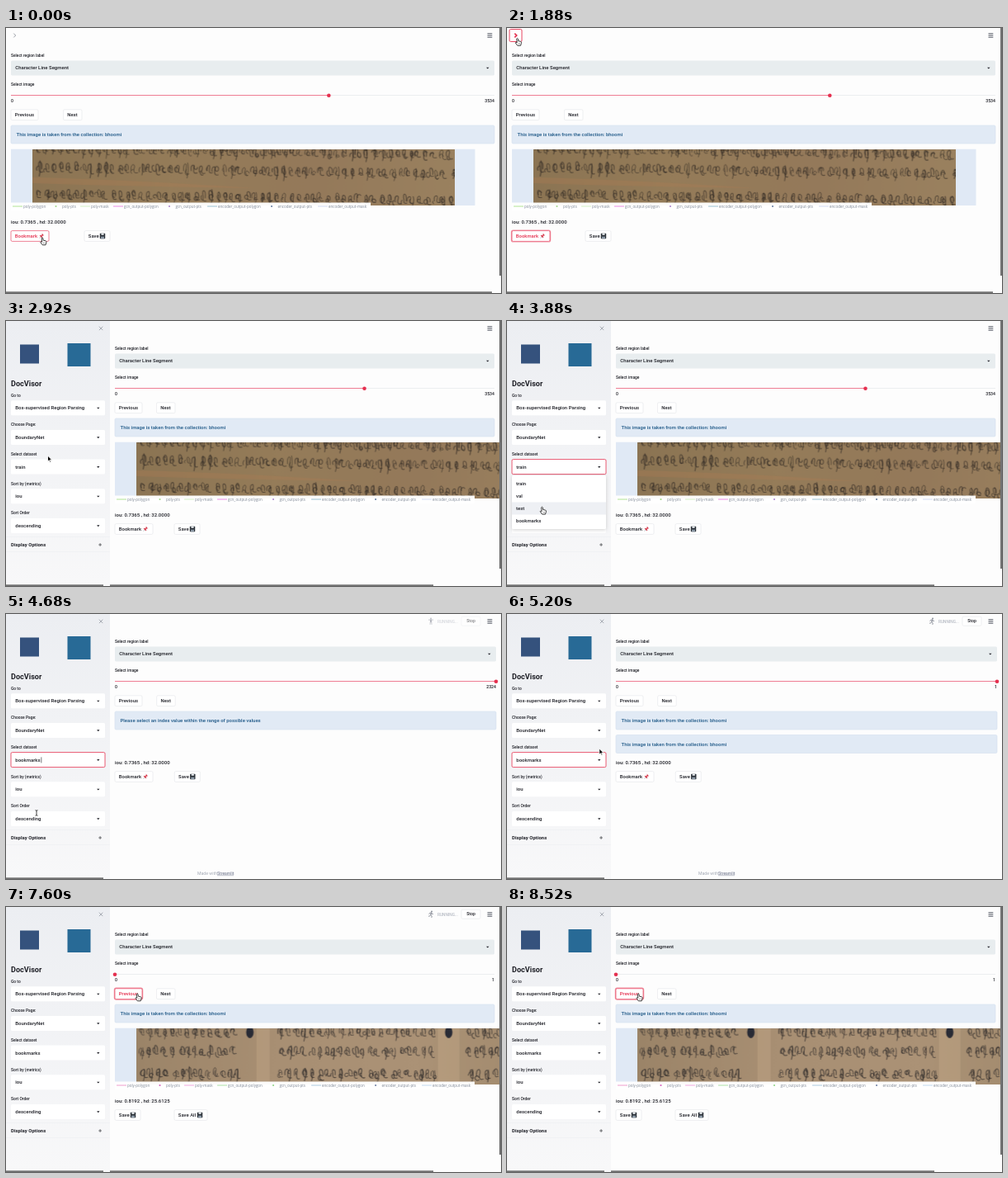
An HTML page with a canvas that plays this animation: 600x321 px, repeating every 8560 ms.

```html
<!DOCTYPE html>
<html lang="en">
<head>
<meta charset="utf-8">
<title>DocVisor</title>
<style>
html, body { margin: 0; width: 100%; height: 100%; overflow: hidden; background: #fdfdfd; }
canvas { display: block; width: 600px; height: 321px; }
</style>
</head>
<body>
<canvas id="c" width="600" height="321"></canvas>
<script>
const LOOP = 8560;
const ctx = document.getElementById('c').getContext('2d');
const SANS = 'Roboto, "Liberation Sans", sans-serif';
const LEGEND_FONT = '"Open Sans", sans-serif';
const RED = '#e5304f', INK = '#1e1f26', LINE = '#e2e4e8', BAR = '#727272';

const clamp = v => Math.max(0, Math.min(1, v));
const ease = v => { v = clamp(v); return v * v * (3 - 2 * v); };
const lerp = (a, b, k) => a + (b - a) * k;

function rng(seed) {
  return () => {
    seed = (seed + 0x6d2b79f5) | 0;
    let r = Math.imul(seed ^ (seed >>> 15), 1 | seed);
    r = (r + Math.imul(r ^ (r >>> 7), 61 | r)) ^ r;
    return ((r ^ (r >>> 14)) >>> 0) / 4294967296;
  };
}

// Large font scaled down keeps fractional advances at small sizes.
function text(str, x, y, { size = 6.02, color = INK, weight = 500, align = 'left', font = SANS } = {}) {
  ctx.save();
  ctx.translate(x, y + size * 0.355);
  ctx.scale(0.1, 0.1);
  ctx.font = `${weight} ${size * 10}px ${font}`;
  ctx.textAlign = align;
  ctx.fillStyle = color;
  ctx.fillText(str, 0, 0);
  ctx.restore();
}

function rect(x, y, w, h, fill) {
  ctx.fillStyle = fill;
  ctx.fillRect(x, y, w, h);
}

function box(x, y, w, h, r, fill, stroke, lw = 0.6) {
  ctx.beginPath();
  ctx.roundRect(x, y, w, h, r);
  if (fill) { ctx.fillStyle = fill; ctx.fill(); }
  if (stroke) { ctx.strokeStyle = stroke; ctx.lineWidth = lw; ctx.stroke(); }
}

function path(points, color, lw, close, fill) {
  ctx.beginPath();
  points.forEach(([x, y], i) => i ? ctx.lineTo(x, y) : ctx.moveTo(x, y));
  if (close) ctx.closePath();
  if (fill) { ctx.fillStyle = fill; ctx.fill(); }
  if (color) { ctx.strokeStyle = color; ctx.lineWidth = lw; ctx.stroke(); }
}

function dot(x, y, r, color) {
  ctx.beginPath();
  ctx.arc(x, y, r, 0, Math.PI * 2);
  ctx.fillStyle = color;
  ctx.fill();
}

// ---- manuscript pictures ----
// A curled stem, a small bowl beside it and sometimes a tail below.
function glyph(g, x, y, w, h, rand) {
  const top = y - h * (0.3 + rand() * 0.2), bot = y + h * (0.3 + rand() * 0.2);
  const stem = x + w * (0.3 + rand() * 0.4), side = rand() < 0.5 ? -1 : 1;
  g.beginPath();
  g.moveTo(stem - side * w * 0.35, y + h * 0.1);
  g.bezierCurveTo(stem - side * w * 0.5, top - 1, stem + side * w * 0.3, top - 2, stem, y);
  g.quadraticCurveTo(stem - w * 0.1, bot, stem + w * 0.45, bot - h * 0.1);
  g.stroke();
  g.beginPath();
  g.ellipse(x + w * (0.25 + rand() * 0.5), y + h * (rand() * 0.4 - 0.15), w * 0.24, h * (0.14 + rand() * 0.1),
    rand() - 0.5, rand() * 3, 4 + rand() * 3);
  g.stroke();
  if (rand() < 0.35) {
    g.beginPath();
    g.moveTo(x + w * 0.7, top);
    g.quadraticCurveTo(x + w * 0.9, y, x + w * 0.6, bot + h * 0.2);
    g.stroke();
  }
}

function picture({ seed, tones, ink, rows, slope, height, lw, gaps = [], extra }) {
  const c = document.createElement('canvas');
  c.width = 512; c.height = 68;
  const g = c.getContext('2d'), rand = rng(seed);
  const grad = g.createLinearGradient(0, 0, 512, 30);
  tones.forEach((t, i) => grad.addColorStop(i / (tones.length - 1), t));
  g.fillStyle = grad;
  g.fillRect(0, 0, 512, 68);
  extra(g);
  g.strokeStyle = ink;
  g.lineCap = 'round';
  for (const y of rows) {
    for (let x = 3; x < 508;) {
      const w = 7 + rand() * 3;
      g.lineWidth = lw * (0.8 + rand() * 0.4);
      if (!gaps.some(([a, b]) => x + w > a && x < b)) {
        glyph(g, x, y + slope * x + rand() * 2, w, height * (0.8 + rand() * 0.4), rand);
      }
      x += w + rand() * 1.2;
    }
  }
  return c;
}

const leafA = picture({
  seed: 11, tones: ['#8b7453', '#957c59', '#94795a', '#9a815f'], ink: 'rgba(48,42,36,.58)',
  rows: [-2, 21, 53], slope: 0.016, height: 14, lw: 1.15,
  extra(g) {
    g.fillStyle = 'rgba(168,122,84,.4)';
    g.beginPath();
    g.moveTo(0, 34);
    g.quadraticCurveTo(120, 37, 270, 47);
    g.quadraticCurveTo(120, 45, 0, 41);
    g.fill();
  }
});
const leafB = picture({
  seed: 29, tones: ['#9b8468', '#a88f73', '#ab9276', '#a0896c'], ink: 'rgba(44,40,40,.62)',
  rows: [4, 27, 54], slope: 0.001, height: 14, lw: 1.15, gaps: [[130, 162], [366, 392]],
  extra(g) {
    g.fillStyle = 'rgba(196,168,136,.4)';
    g.fillRect(146, 0, 16, 68);
    g.fillRect(366, 0, 26, 68);
    g.fillStyle = '#292b35';
    for (const x of [138, 379]) {
      g.beginPath();
      g.ellipse(x, 5, 4.5, 7, 0, 0, 7);
      g.fill();
    }
  }
});

// ---- small icons ----
function pin(x, y) {
  path([[x - 2.3, y + 2.6], [x, y]], '#8a8f98', 0.6);
  path([[x - 1.8, y - 0.7], [x + 0.9, y + 1.8]], '#c93545', 1.2);
  path([[x - 0.3, y + 0.3], [x + 1.8, y - 1.9]], '#e0475a', 1.7);
  path([[x + 0.7, y - 2.6], [x + 2.5, y - 0.8]], '#c93545', 1);
}

function floppy(x, y) {
  box(x - 3.2, y - 3.2, 6.4, 6.4, 0.6, '#2b3138');
  rect(x - 1.6, y - 3.2, 3.2, 2, '#e6eaee');
  rect(x - 2, y + 0.6, 4, 2.6, '#8b98a5');
}

function caret(x, y) {
  path([[x - 1.7, y - 0.9], [x + 1.7, y - 0.9], [x, y + 1]], null, 0, true, INK);
}

function button(label, x, y, w, { icon, hot, focus } = {}) {
  const h = 12.8;
  if (focus) box(x - 0.5, y - h / 2 - 0.5, w + 1, h + 1, 2, null, 'rgba(229,48,79,.5)', 1.4);
  box(x, y - h / 2, w, h, 1.5, '#fff', hot || focus ? RED : LINE);
  text(label, x + 4.8, y, { color: hot || focus ? RED : INK, size: 5.95 });
  if (icon) icon(x + w - 9, y);
}

// ---- timing ----
const MOVES = [
  [0, 44, 254], [760, 44, 254], [1600, 12.5, 12.5], [2240, 12.5, 12.5],
  [2880, 50.5, 163], [2960, 50.5, 163], [3120, 60, 175], [3280, 60, 175],
  [4160, 37, 241], [4800, 37, 241], [5160, 111.8, 163], [5480, 111.8, 163],
  [6360, 159.2, 105], [LOOP, 159.2, 105]
];
const RUNS = [[240, 760], [4440, 5640], [6760, 7640]];
const SELECTS = ['Go to', 'Choose Page:', 'Select dataset', 'Sort by (metrics)', 'Sort Order'];
const SETS = ['train', 'val', 'test', 'bookmarks'];
const rowY = i => 105.3 + i * 35.65;

function pointer(t) {
  const i = MOVES.findIndex(m => m[0] > t), a = MOVES[i - 1], b = MOVES[i];
  const k = ease((t - a[0]) / (b[0] - a[0]));
  return { x: lerp(a[1], b[1], k), y: lerp(a[2], b[2], k) };
}

function stateAt(t) {
  const p = pointer(t);
  const open = ease((t - 1960) / 300);
  const phase = t < 4560 ? 'first' : t < 4840 ? 'range' : t < 5240 ? 'both' : 'marked';
  const side = 126 * open, left = side + 6;
  const plot = phase === 'first' || phase === 'marked';
  const right = plot ? 592 : 594;
  return {
    t, p, open, phase, side, left, right, plot, width: right - left,
    menu: t >= 3200 && t < 4320,
    focusSet: t >= 3160 && t < 6600,
    chosen: t >= 4320 ? 'bookmarks' : 'train',
    zero: t >= 7120, second: t >= 7320
  };
}

// ---- page parts ----
const LEGENDS = {
  first: ['#a8e08a', '#a5d98c', '#cdeebc', '#e77fe0', '#b08ad0', '#8fb9cc', '#6c82a5', '#ccd5f0'],
  one: ['#ee92d8', '#cf70c8', '#f0a0dc', '#a3dda0', '#93d68a', '#f0c0a0', '#d8a04a', '#f0b8a8'],
  zero: ['#ee92c8', '#d765c0', '#f0a0dc', '#a3dd9c', '#93d68a', '#a4c5dc', '#7585a8', '#bcd4ee']
};
const ITEMS = [
  ['poly-polygon', 2], ['poly-pts', 49], ['poly-mask', 84], ['gcn_output-polygon', 124],
  ['gcn_output-pts', 186.5], ['encoder_output-polygon', 238], ['encoder_output-pts', 310.5],
  ['encoder_output-mask', 372]
];

function legend(x, colors) {
  rect(x, 211.5, 436, 9.5, 'rgba(255,255,255,.96)');
  ITEMS.forEach(([name, dx], i) => {
    const cx = x + dx;
    if (name.endsWith('pts')) dot(cx + 5.5, 216, 1.1, colors[i]);
    else path([[cx, 216], [cx + 12, 216]], colors[i], 0.9);
    text(name, cx + 13, 216, { size: 4.5, weight: 400, color: '#7c8593', font: LEGEND_FONT });
  });
}

function plot(s) {
  const x = s.left;
  ctx.save();
  ctx.beginPath();
  ctx.rect(s.side, 140, 598 - s.side, 90);
  ctx.clip();
  rect(x, 146.7, 562.5, 68.3, '#e0e9f5');
  ctx.drawImage(s.second ? leafB : leafA, x + 25.6, 146.7, 512, 68.3);
  legend(x, s.phase === 'first' ? LEGENDS.first : s.second ? LEGENDS.zero : LEGENDS.one);
  ctx.restore();
}

function info(s, y, str) {
  box(s.left, y, s.width, 22, 1.5, '#e1eaf5', '#d3dfee', 0.6);
  text(str, s.left + 6.5, y + 11, { color: '#1d5786', size: 6 });
}

function slider(s) {
  const { left, right, width, phase } = s;
  const frac = phase === 'first' ? 0.6575 : s.zero ? 0 : 1;
  const max = phase === 'first' ? '3534' : phase === 'range' ? '2324' : '1';
  const x = left + width * frac;
  rect(left, 81, width, 1, '#eceef0');
  rect(left, 81, x - left, 1, '#ee7d93');
  dot(x, 81.7, 2.3, RED);
  text('0', left, 88.6, { size: 5.2 });
  text(max, right, 88.6, { size: 5.2, align: 'right' });
}

function main(s) {
  const { left, width, right, phase, p, t } = s;
  text('Select region label', left, 33, { size: 4.9 });
  box(left, 39.5, width, 18, 1.5, '#e8edef');
  text('Character Line Segment', left + 5.3, 48.3);
  caret(right - 8.2, 48.6);
  text('Select image', left, 68.4, { size: 4.9 });
  slider(s);

  const overPrev = s.open === 1 && p.x > 132 && p.x < 165 && p.y > 99 && p.y < 112;
  button('Previous', left, 105.2, 33, { hot: overPrev, focus: t >= 6600 });
  button('Next', left + 3 + width * 0.1032, 105.2, 22.5);

  const note = 'This image is taken from the collection: bhoomi';
  info(s, 118, phase === 'range' ? 'Please select an index value within the range of possible values' : note);
  if (phase === 'both') info(s, 146.5, note);
  if (s.plot) plot(s);

  const by = s.plot ? 252 : 197;
  text(s.second ? 'iou: 0.8192 , hd: 25.6125' : 'iou: 0.7365 , hd: 32.0000', left, by - 17.3);
  const saveX = left + 9.9 + width * 0.135;
  if (phase === 'marked') {
    button('Save', left, by, 31, { icon: floppy });
    button('Save All', saveX, by, 40, { icon: floppy });
  } else {
    button('Bookmark', left, by, 46, { icon: pin, hot: t < 800, focus: t >= 120 && t < 1960 });
    button('Save', saveX, by, 31, { icon: floppy });
  }

  if (s.plot) {
    rect(598, 0, 2, 300, BAR);
    rect(s.side, 319.3, lerp(589, 392, s.open), 1.7, BAR);
  } else {
    text('Made with ', 232, 314, { size: 5.2, color: '#a3a8b4', weight: 400 });
    text('Streamlit', 256, 314, { size: 5, color: '#80869a' });
    rect(256, 316.6, 20, 0.5, '#80869a');
  }
}

function runner(x, y, t) {
  const c = '#8c909a', wide = Math.floor(t / 520) % 2;
  dot(x + (wide ? 0 : 1), y - 3.4, 1, c);
  if (wide) {
    path([[x - 3, y - 1.7], [x + 3, y - 1.7]], c, 0.9);
    path([[x, y - 2], [x, y + 1]], c, 1.8);
    path([[x - 1, y + 4], [x - 0.6, y], [x + 0.6, y], [x + 1, y + 4]], c, 0.8);
  } else {
    path([[x + 0.7, y - 2], [x - 0.4, y + 0.8]], c, 1.4);
    path([[x - 2.4, y], [x - 1.2, y - 1.8], [x + 0.8, y - 1.8], [x + 1.6, y - 0.2], [x + 3, y - 0.4]], c, 0.8);
    path([[x - 3, y + 2.4], [x - 1.2, y + 2.2], [x - 0.3, y + 0.7], [x + 1.2, y + 2], [x + 0.8, y + 4.2]], c, 0.9);
  }
}

function header(s) {
  [6.8, 9, 11.2].forEach(y => rect(583.5, y - 0.5, 5.8, 1, '#555964'));
  const run = RUNS.find(([a, b]) => s.t >= a && s.t < b);
  if (run) {
    ctx.globalAlpha = clamp((s.t - run[0]) / 450);
    runner(515, 8.8, s.t);
    text('RUNNING...', 523, 9, { size: 4.8, color: '#a3a8b4', weight: 400 });
    box(552, 3.2, 23, 11, 1.5, '#fff', LINE);
    text('Stop', 563.5, 8.5, { size: 5.2, align: 'center' });
    ctx.globalAlpha = 1;
  }
  if (s.t < 1960) {
    const hot = s.p.x < 18 && s.p.y < 17;
    if (hot) box(3, 1.5, 15, 15, 1.5, '#fff', RED, 0.9);
    path([[9.3, 6.6], [11.7, 9], [9.3, 11.4]], hot ? RED : '#8c909a', hot ? 1.7 : 0.9);
  }
}

function menu(s) {
  ctx.save();
  ctx.shadowColor = 'rgba(0,0,0,.18)';
  ctx.shadowBlur = 4;
  ctx.shadowOffsetY = 1;
  box(6, 187, 114, 65, 1.5, '#fff');
  ctx.restore();
  const over = Math.max(0, Math.min(3, Math.floor((s.p.y - 189.5) / 15)));
  rect(6, 189.5 + over * 15, 114, 15, '#eef0f4');
  SETS.forEach((name, i) => text(name, 11, 197 + i * 15));
}

function sidebar(s) {
  if (s.open === 0) return;
  ctx.save();
  ctx.translate(s.side - 126, 0);
  const shade = ctx.createLinearGradient(0, 0, 0, 321);
  shade.addColorStop(0, '#eceef2');
  shade.addColorStop(1, '#f8f8f9');
  rect(0, 0, 126, 321, shade);
  path([[112.9, 6.7], [117.3, 11.1]], '#9297a1', 0.8);
  path([[117.3, 6.7], [112.9, 11.1]], '#9297a1', 0.8);
  rect(17, 28.5, 23, 23, '#35527d');
  rect(74.5, 27, 28, 28, '#286a96');
  text('DocVisor', 6, 75.8, { size: 9.1, weight: 700 });

  const values = ['Box-supervised Region Parsing', 'BoundaryNet', s.chosen, 'iou', 'descending'];
  SELECTS.forEach((label, i) => {
    const y = rowY(i), focus = i === 2 && s.focusSet;
    text(label, 6, y - 15.4, { size: 4.9 });
    box(6, y - 9, 114, 18, 1.5, '#fff', focus ? RED : null, 0.8);
    text(values[i], 11.3, y);
    caret(111.8, y + 0.3);
  });
  if (s.t >= 4320 && s.t < 4900) rect(42.6, 173.4, 0.6, 7, INK);

  rect(0, 261, 126, 0.4, '#e6e8ec');
  text('Display Options', 6, 270.8, { weight: 700 });
  path([[112.2, 271], [116, 271]], INK, 0.6);
  path([[114.1, 269.1], [114.1, 272.9]], INK, 0.6);
  rect(0, 279.5, 126, 0.4, '#e6e8ec');
  rect(0, 319.3, 118, 1.7, BAR);
  if (s.menu) menu(s);
  ctx.restore();
}

// ---- pointer shapes ----
function arrow(x, y) {
  path([[x, y], [x, y + 7.2], [x + 1.7, y + 5.7], [x + 2.8, y + 8.2], [x + 4, y + 7.7],
    [x + 2.9, y + 5.3], [x + 5.1, y + 5.2]], '#fff', 0.9, true, '#000');
}

function hand(x, y) {
  ctx.beginPath();
  ctx.moveTo(x - 0.9, y + 0.6);
  ctx.quadraticCurveTo(x, y - 0.8, x + 0.8, y + 0.5);
  ctx.lineTo(x + 1.2, y + 3.2);
  ctx.lineTo(x + 4.2, y + 3.8);
  ctx.quadraticCurveTo(x + 5.2, y + 4.2, x + 4.9, y + 6);
  ctx.lineTo(x + 4, y + 8.8);
  ctx.lineTo(x + 0.2, y + 8.8);
  ctx.lineTo(x - 2.3, y + 5.4);
  ctx.quadraticCurveTo(x - 2, y + 4.2, x - 0.3, y + 5.2);
  ctx.closePath();
  ctx.fillStyle = '#fff';
  ctx.fill();
  ctx.strokeStyle = '#111';
  ctx.lineWidth = 0.8;
  ctx.stroke();
  path([[x + 1.5, y + 5.6], [x + 1.6, y + 7.4]], '#333', 0.4);
  path([[x + 2.9, y + 5.6], [x + 2.9, y + 7.4]], '#333', 0.4);
}

function beam(x, y) {
  path([[x, y - 3], [x, y + 3]], '#111', 0.8);
  for (const d of [-1, 1]) path([[x - 1.5, y + 3.4 * d], [x, y + 2.8 * d], [x + 1.5, y + 3.4 * d]], '#111', 0.7);
}

function cursor(s) {
  const { x, y } = s.p, t = s.t;
  const overSelect = s.open === 1 && x > 6 && x < 120 && SELECTS.some((_, i) => Math.abs(y - rowY(i)) < 9);
  const overButton = t < 800 || (t < 1980 && x < 18 && y < 17) ||
    (t > 5480 && x > 132 && x < 165 && y > 99 && y < 112);
  if (overButton || (s.menu && y > 187)) hand(x, y);
  else if (overSelect) beam(x, y);
  else arrow(x, y);
}

function draw(t) {
  const s = stateAt(t);
  rect(0, 0, 600, 321, '#fdfdfd');
  main(s);
  header(s);
  sidebar(s);
  cursor(s);
}

const start = performance.now();
function tick() {
  draw((performance.now() - start) % LOOP);
  requestAnimationFrame(tick);
}
tick();
</script>
</body>
</html>
```
